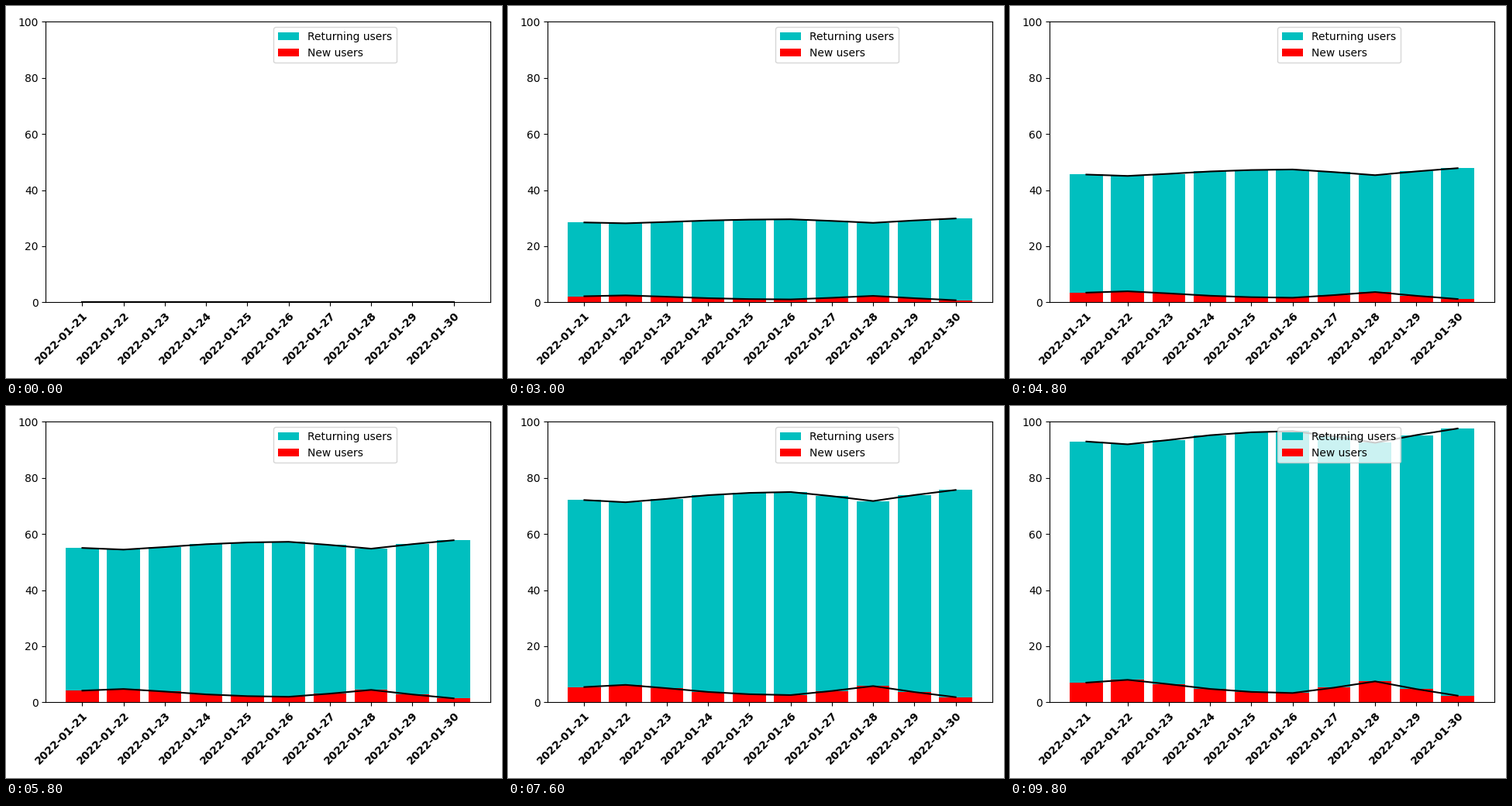
A matplotlib script that plays this animation: 640x480 px, repeating every 10000 ms.

```python
import numpy as np
import matplotlib.pyplot as plt
from matplotlib.animation import FuncAnimation

plt.rcParams["font.family"] = "DejaVu Sans"

FRAMES = 50
INTERVAL = 200

dates = [f"2022-01-{day}" for day in range(21, 31)]
new = np.array([7.0, 8.0, 6.45, 4.75, 3.7, 3.3, 5.2, 7.45, 4.7, 2.35])
returning = 100 - new
x = np.arange(len(dates))

fig, ax = plt.subplots(figsize=(6.4, 4.8), dpi=100)


def add_series(color, label):
    bars = ax.bar(x, np.zeros(len(x)), color=color, label=label)
    line, = ax.plot(x, np.zeros(len(x)), color="black")
    return bars, line


series = [
    (returning, *add_series("c", "Returning users")),
    (new, *add_series("red", "New users")),
]

ax.set_ylim(0, 100)
ax.set_xticks(x)
ax.set_xticklabels(dates, rotation=45, ha="right", rotation_mode="anchor",
                   fontweight="bold")
ax.legend(loc="upper left", bbox_to_anchor=(0.5, 1))
fig.tight_layout()


def update(frame):
    share = frame / (FRAMES - 1)
    artists = []
    for values, bars, line in series:
        heights = values * share
        for bar, height in zip(bars, heights):
            bar.set_height(height)
        line.set_ydata(heights)
        artists += [*bars, line]
    return artists


anim = FuncAnimation(fig, update, frames=FRAMES, interval=INTERVAL,
                     init_func=lambda: update(0), repeat=True, repeat_delay=0)
plt.show()
```
